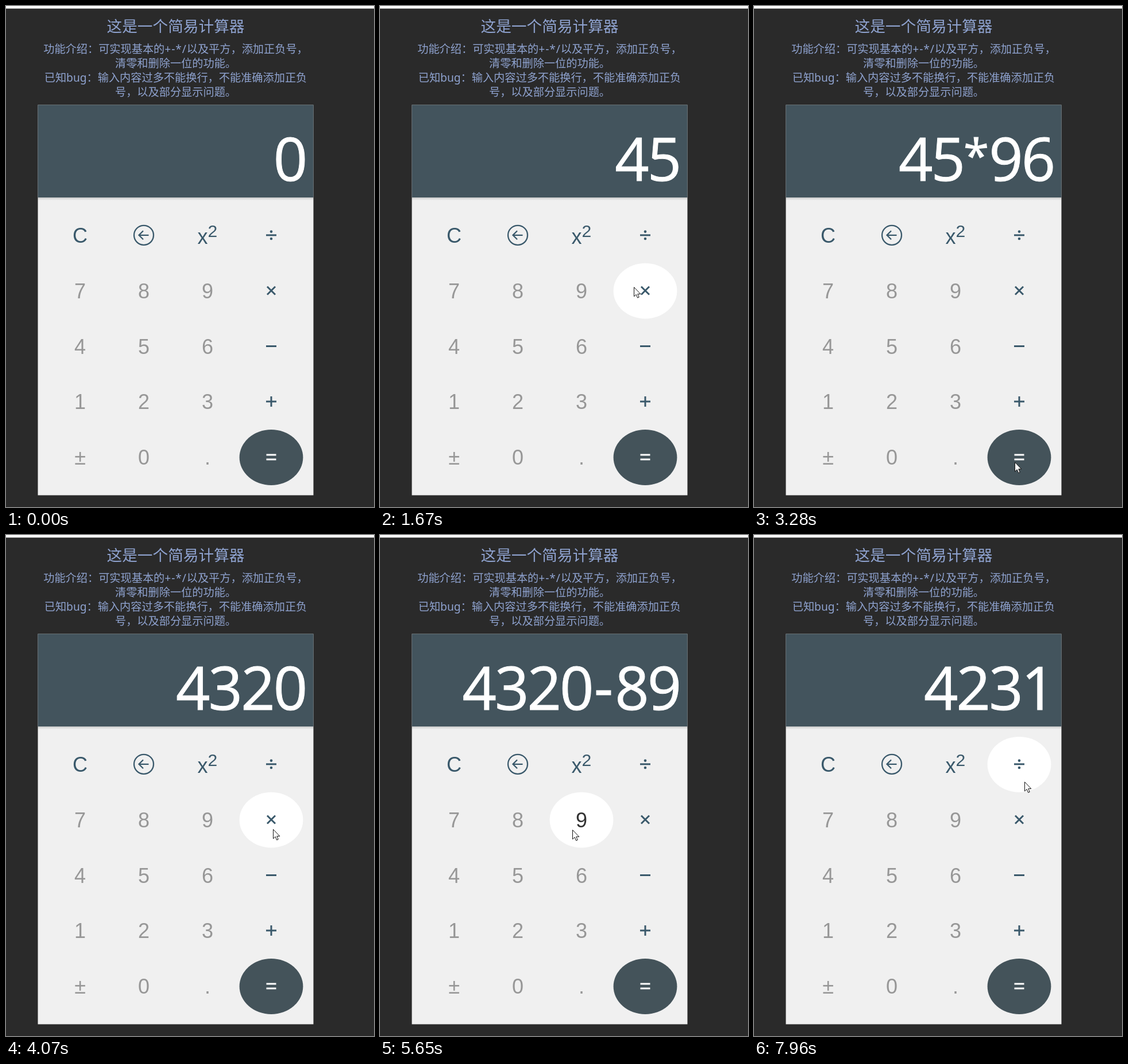
Write an HTML page that moves like this. It is 641x874 px and loops after 8 s.

```html
<!DOCTYPE html>
<html lang="zh-CN">
<head>
<meta charset="utf-8">
<title>简易计算器</title>
<style>
  html, body { margin: 0; width: 100%; height: 100%; overflow: hidden; background: #2a2a2a; }
  svg { display: block; width: 100vw; height: 100vh; }
  .intro { font: 19.2px "Noto Sans", "Noto Sans CJK SC", "Noto Sans CJK", sans-serif; fill: #8fa3d0; text-anchor: middle; }
  .title { font-size: 26.67px; }
  .ops { letter-spacing: .9px; }
  #screen { font: 104px "Open Sans", "Noto Sans", sans-serif; letter-spacing: -2.9px; fill: #fff; stroke: #fff; stroke-width: 1; text-anchor: end; }
  #screen .star { font-size: 80px; letter-spacing: 0; }
  #screen .dash { letter-spacing: 3px; }
  .key { --ink: #979797; }
  .key.op { --ink: #3a596b; }
  .key.equal { --ink: #fff; }
  .key text { font: 36px "Liberation Sans", Arial, sans-serif; fill: var(--ink); text-anchor: middle; }
  .key .power { text-anchor: start; }
  .key .power tspan { font-size: 30px; }
  .key ellipse { fill: none; }
  .key path, .key circle { fill: none; stroke: var(--ink); stroke-width: 3; }
  .key .thin { stroke-width: 2.3; }
  .key .dot { fill: var(--ink); stroke: none; }
  .key.hover ellipse { fill: #fff; }
  .key.hover:not(.op) { --ink: #333; }
  .key.equal ellipse { fill: #44535a; }
</style>
</head>
<body>
<svg viewBox="0 0 641 874" preserveAspectRatio="none">
  <defs>
    <linearGradient id="shade" x2="0" y2="1">
      <stop stop-color="#000" stop-opacity=".16"/>
      <stop offset="1" stop-color="#000" stop-opacity="0"/>
    </linearGradient>
  </defs>
  <rect width="641" height="874" fill="#2a2a2a"/>
  <rect width="641" height="4.5" fill="#fdfdfd"/>

  <g class="intro">
    <text class="title" x="295.5" y="44.5">这是一个简易计算器</text>
    <text x="295.5" y="82.3">功能介绍：可实现基本的<tspan class="ops">+-*/</tspan>以及平方，添加正负号，</text>
    <text x="295.5" y="107.3">清零和删除一位的功能。</text>
    <text x="295.5" y="132.3">已知bug：输入内容过多不能换行，不能准确添加正负</text>
    <text x="295.5" y="157.3">号，以及部分显示问题。</text>
  </g>

  <rect x="55.5" y="172.5" width="480" height="681" fill="#f0f0f0"/>
  <rect x="55.5" y="172.5" width="480" height="161.5" fill="#43545d"/>
  <rect x="55.5" y="334" width="480" height="5" fill="url(#shade)"/>
  <text id="screen" x="522.3" y="305"></text>

  <g id="keys"></g>

  <path id="cursor" d="M.5 .5V16.6L4.2 13.2L6.6 19L9.2 17.9L6.8 12.3H11.8Z"
        fill="#fff" stroke="#111" stroke-linejoin="round"/>
</svg>

<script>
const LOOP = 8000, ENTER = 30, PAUSE = 160;
const RX = 55.4, RY = 48.4;
const byId = id => document.getElementById(id);
const screenText = byId('screen'), cursor = byId('cursor');

// Symbols are drawn around the centre of their key.
const icons = {
  '←': '<circle class="thin" r="17" cy="-.5"/><path class="thin" d="M8.5 -.5H-8M-1 -8L-8.5 -.5L-1 7"/>',
  '²': '<text class="power" x="-17.4" y="14.7">x<tspan dy="-12">2</tspan></text>',
  '/': '<path d="M-9 -.5H9"/><circle class="dot" r="2.3" cy="-6.7"/><circle class="dot" r="2.3" cy="5.7"/>',
  '*': '<path d="M-7 -7.6L7 6.4M-7 6.4L7 -7.6"/>',
  '-': '<path d="M-9 -.4H9"/>',
  '+': '<path d="M-9 -.6H9M0 -9.6V8.4"/>',
  '=': '<path d="M-8.5 -4.6H8.5M-8.5 3.4H8.5"/>'
};

const keys = {};
[...'C←²/789*456-123+±0.='].forEach((name, i) => {
  const x = 129 + 111 * (i % 4), y = 400.3 + 96.8 * Math.floor(i / 4);
  const g = document.createElementNS('http://www.w3.org/2000/svg', 'g');
  const base = name === '=' ? 'key op equal' : name === 'C' || icons[name] ? 'key op' : 'key';
  g.setAttribute('transform', `translate(${x} ${y})`);
  g.innerHTML = `<ellipse rx="${RX}" ry="${RY}"/>` + (icons[name] || `<text y="12.7">${name}</text>`);
  byId('keys').append(g);
  keys[name] = { g, x, y, base };
});

// One stop of the pointer at a key; by default just below the symbol.
const stop = (name, at, dx = 3, dy = 16) =>
  ({ name, at, x: keys[name].x + dx, y: keys[name].y + dy });
const press = (...args) => ({ ...stop(...args), pressed: true });

const tour = [
  press('4', 820, -17, -14), press('5', 1290, -8, -6), press('*', 1750, -20, -7),
  press('9', 2540), press('6', 2960, 2, -8), press('=', 3380, -8, 8),
  stop('*', 4100), press('-', 4480, -7, -9), press('8', 4860),
  press('9', 5320, -16, 17), stop('9', 5520, -16, 17), press('=', 6170, -10, -8),
  stop('-', 6580, -41, -22), stop('5', 7000), stop('3', 7340, -8, -18),
  stop('-', 7680), stop('/', 8110, 9, 30)
];

// The calculator itself: "=" works the line out, other keys extend it.
const apply = (line, { a, op, b } = line.match(/(?<a>\d+)(?<op>\D)(?<b>\d+)/).groups) =>
  String(op === '*' ? a * b : a - b);
const type = (line, key) =>
  key === '=' ? apply(line) : line === '0' ? key : line + key;
const display = t =>
  tour.filter(s => s.pressed && s.at <= t).reduce((line, s) => type(line, s.name), '0');

// Rest around each stop, glide smoothly in between.
function pointer(t) {
  const i = tour.findIndex(s => t < s.at + PAUSE);
  const to = tour[i], from = tour[i - 1] || { x: 450, y: 834, at: ENTER - PAUSE };
  const leave = from.at + PAUSE, arrive = to.at - PAUSE;
  const k = Math.min(1, (t - leave) / (arrive - leave));
  const ease = k * k * (3 - 2 * k);
  return { x: from.x + (to.x - from.x) * ease, y: from.y + (to.y - from.y) * ease };
}

// Operators are raised to the middle of the digits.
const raised = (cls, sign, lift, gap) =>
  `<tspan class="${cls}" dx="${gap}" dy="${-lift}">${sign}</tspan><tspan dy="${lift}">`;
function markup(line) {
  const [, a, op, b] = line.match(/(\d+)(\D?)(\d*)/);
  if (!op) return a;
  const sign = op === '*' ? raised('star', op, 15, 0) : raised('dash', op, 2, 3);
  return a + sign + b + '</tspan>';
}

let shown;
function draw(t) {
  const line = display(t);
  if (line !== shown) screenText.innerHTML = markup(shown = line);

  const p = t >= ENTER && pointer(t);
  cursor.style.display = p ? '' : 'none';
  if (p) cursor.setAttribute('transform', `translate(${p.x} ${p.y})`);
  for (const { g, x, y, base } of Object.values(keys)) {
    const over = p && Math.hypot((p.x - x) / RX, (p.y - y) / RY) < 1;
    g.setAttribute('class', over ? base + ' hover' : base);
  }
}

const start = performance.now();
(function tick() {
  draw((performance.now() - start) % LOOP);
  requestAnimationFrame(tick);
})();
</script>
</body>
</html>
```
